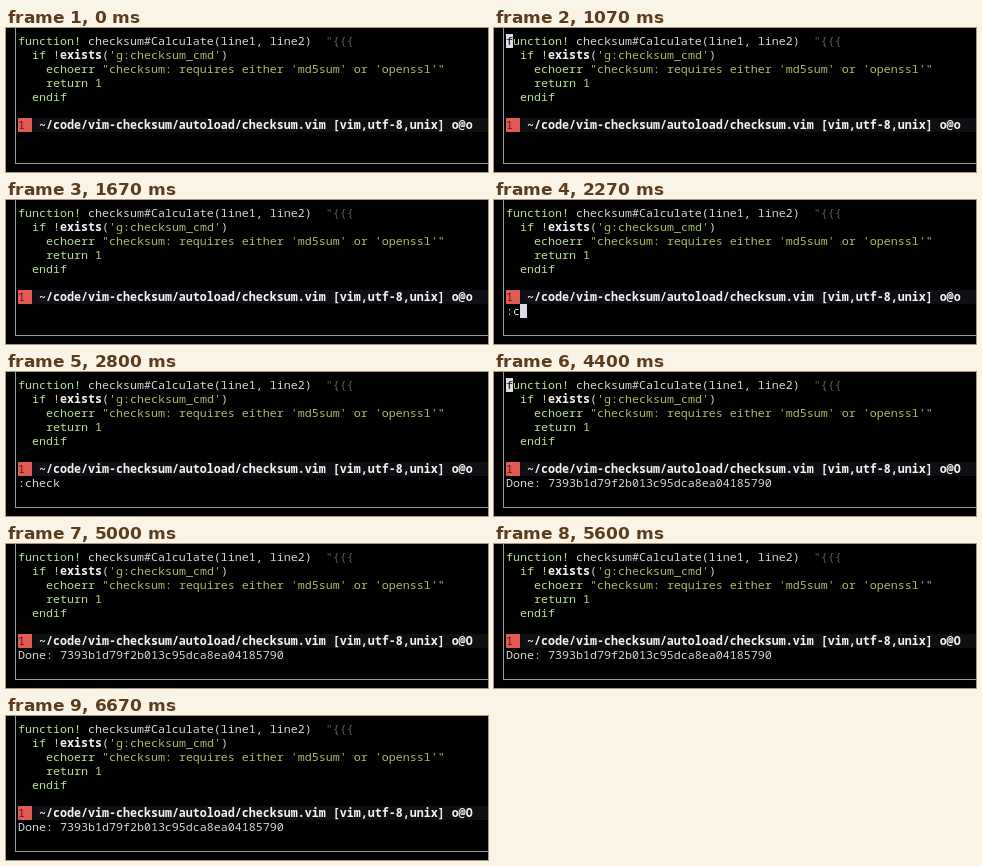
An HTML page for the animation above (6.74 s loop, 482x144 px).

```html
<!DOCTYPE html>
<html lang="en">
<head>
<meta charset="utf-8">
<title>Checksum command</title>
<style>
  html, body { margin: 0; width: 100%; height: 100%; overflow: hidden; background: #000; }
  #stage { position: relative; width: 482px; height: 144px; overflow: hidden; }
  #pane {
    position: absolute; left: 9px; top: 0; width: 473px; height: 135px;
    border: solid #9a9a9a; border-width: 0 0 1px 1px;
  }
  .row, #cursor {
    position: absolute; height: 14px; white-space: pre; color: #d6d6d2;
    font: 11.667px/14px "Noto Sans Mono", "DejaVu Sans Mono", monospace;
    font-variant-ligatures: none;
  }
  .row { left: 12px; width: 470px; }
  #cursor { width: 7px; background: #dcdce6; color: #111; }
  .key { color: #b9e094; }
  .str { color: #a3bf62; }
  .num { color: #dcc88a; }
  .fold { color: #5c5a50; }
  .call { color: #f0f0f0; font-weight: bold; }
  .bar { color: #f4f4f4; font-weight: bold; background: #0f0e13; }
  .flag { display: inline-block; width: 14px; height: 14px; vertical-align: top;
    background: #e25a55; color: #6a1614; font-weight: normal; }
  #menu { background: #150b12; }
  .pick { display: inline-block; height: 14px; vertical-align: top;
    background: #0b6b72; color: #c4ecea; font-weight: normal; }
</style>
</head>
<body>
<div id="stage">
  <div id="pane"></div>
  <div class="row" style="top:6px"><span class="key">function!</span> checksum#Calculate(line1, line2)  <span class="fold">"{{{</span></div>
  <div class="row" style="top:20px">  <span class="key">if</span> <span class="num">!</span><span class="call">exists</span>(<span class="str">'g:checksum_cmd'</span>)</div>
  <div class="row" style="top:34px">    <span class="key">echoerr</span> <span class="str">"checksum: requires either 'md5sum' or 'openssl'"</span></div>
  <div class="row" style="top:48px">    <span class="key">return</span> <span class="num">1</span></div>
  <div class="row" style="top:62px">  <span class="key">endif</span></div>
  <div class="row bar" id="status" style="top:90px"><span class="flag">1</span> ~/code/vim-checksum/autoload/checksum.vim [vim,utf-8,unix] o@<span id="mark">o</span></div>
  <div class="row bar" id="menu" style="top:90px"><span class="pick">Checksum</span>  checkpath  checktime</div>
  <div class="row" id="command" style="top:104px"></div>
  <div id="cursor"></div>
</div>
<script>
  const LOOP = 6740, CELL = 7, LEFT = 12;
  const BLINK_START = 70, BLINK_HALF = 500;
  const DONE = 4270, MENU = 3000;

  // Command line contents, each from its start time on.
  const commands = [
    [0, ""],
    [1930, ":"],
    [2200, ":c"],
    [2330, ":ch"],
    [2470, ":che"],
    [2600, ":chec"],
    [2730, ":check"],
    [MENU, ":Checksum"],
    [DONE, "Done: 7393b1d79f2b013c95dca8ea04185790"]
  ];

  const el = id => document.getElementById(id);
  const [status, menu, mark, command, cursor] =
    ["status", "menu", "mark", "command", "cursor"].map(el);
  const show = (node, on) => { node.style.visibility = on ? "visible" : "hidden"; };

  function draw(t) {
    const text = commands.filter(([start]) => t >= start).pop()[1];
    const typing = text.startsWith(":");
    const picking = t >= MENU && t < DONE;

    command.textContent = text;
    mark.textContent = t >= DONE ? "O" : "o";
    show(status, !picking);
    show(menu, picking);

    cursor.style.left = LEFT + (typing ? text.length * CELL : 0) + "px";
    cursor.style.top = (typing ? 104 : 6) + "px";
    cursor.textContent = typing ? "" : "f";
    const phase = (t - BLINK_START) % (2 * BLINK_HALF);
    show(cursor, phase >= 0 && phase < BLINK_HALF);
  }

  const begin = performance.now();
  function tick() {
    draw((performance.now() - begin) % LOOP);
    requestAnimationFrame(tick);
  }
  draw(0);
  requestAnimationFrame(tick);
</script>
</body>
</html>
```
